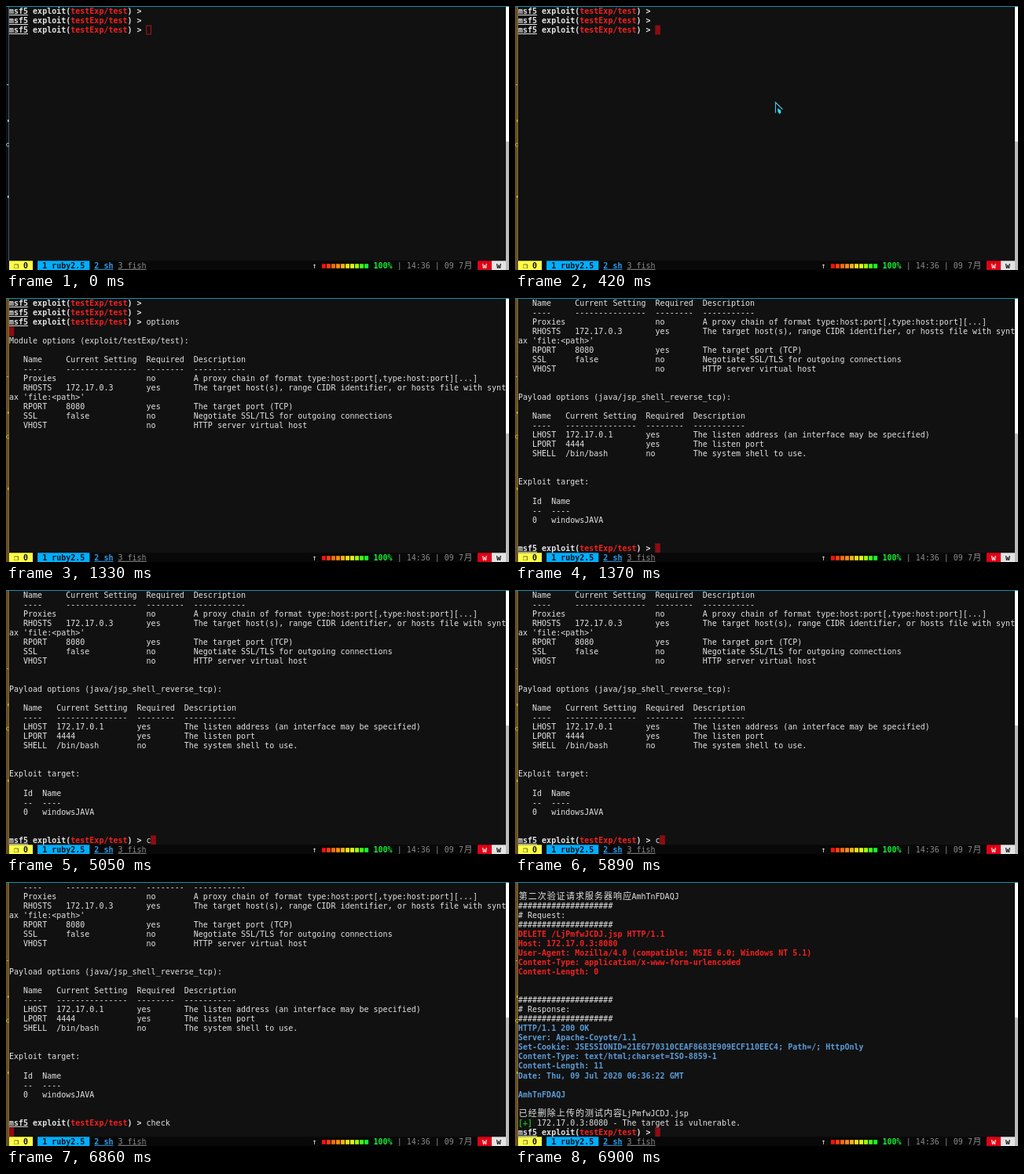
Write an HTML page with a canvas that moves like this. It is 640 by 337 pixels and loops after 8000 ms.

```html
<!DOCTYPE html>
<html lang="en">
<head>
<meta charset="utf-8">
<title>Terminal session</title>
<style>
html, body { margin: 0; width: 100%; height: 100%; overflow: hidden; background: #111; }
canvas { display: block; width: 640px; height: 337px; }
</style>
</head>
<body>
<canvas id="stage" width="640" height="337"></canvas>
<script>
const LOOP = 8000, CW = 6.02, RH = 12.03, LEFT = 4, TOP = 0.5, LAST = 26;
const FG = '#e2e2e2', RED = '#f4201f', BLUE = '#5b9bd6', GREEN = '#1fb31f', GREY = '#8a8a8a';
const MONO = '"DejaVu Sans Mono", "DejaVu Sans", monospace';
const CJK = '"Noto Sans CJK SC", "Noto Sans CJK", sans-serif';
const ctx = document.getElementById('stage').getContext('2d');

const OPTIONS = `   Name     Current Setting  Required  Description
   ----     ---------------  --------  -----------
   Proxies                   no        A proxy chain of format type:host:port[,type:host:port][...]
   RHOSTS   172.17.0.3       yes       The target host(s), range CIDR identifier, or hosts file with synt
ax 'file:<path>'
   RPORT    8080             yes       The target port (TCP)
   SSL      false            no        Negotiate SSL/TLS for outgoing connections
   VHOST                     no        HTTP server virtual host`.split('\n');

const PAYLOAD = `

Payload options (java/jsp_shell_reverse_tcp):

   Name   Current Setting  Required  Description
   ----   ---------------  --------  -----------
   LHOST  172.17.0.1       yes       The listen address (an interface may be specified)
   LPORT  4444             yes       The listen port
   SHELL  /bin/bash        no        The system shell to use.


Exploit target:

   Id  Name
   --  ----
   0   windowsJAVA
`.split('\n');

const HASHES = '#'.repeat(20);
const HEAD = ['', '第二次验证请求服务器响应AmhTnFDAQJ', HASHES, '# Request:', HASHES];
const REQUEST = `DELETE /LjPmfwJCDJ.jsp HTTP/1.1
Host: 172.17.0.3:8080
User-Agent: Mozilla/4.0 (compatible; MSIE 6.0; Windows NT 5.1)
Content-Type: application/x-www-form-urlencoded
Content-Length: 0`.split('\n');
const RESPONSE = `HTTP/1.1 200 OK
Server: Apache-Coyote/1.1
Set-Cookie: JSESSIONID=21E6770310CEAF8683E909ECF110EEC4; Path=/; HttpOnly
Content-Type: text/html;charset=ISO-8859-1
Content-Length: 11
Date: Thu, 09 Jul 2020 06:36:22 GMT

AmhTnFDAQJ`.split('\n');

// [time, text typed at the prompt]
const OPTIONS_KEYS = [[0, ''], [1000, 'o'], [1080, 'op'], [1160, 'opt'], [1250, 'options']];
const CHECK_KEYS = [[0, ''], [5050, 'c'], [5160, 'ch'], [5510, 'c'], [5720, ''], [5890, 'c'],
  [5970, 'ch'], [6050, 'che'], [6210, 'chec'], [6380, 'check'], [6590, 'check ']];

const cellX = col => LEFT + col * CW;
const cellY = row => TOP + row * RH;
const typed = (keys, t) => keys.filter(k => k[0] <= t).pop()[1];

function rect(x, y, w, h, color) {
  ctx.fillStyle = color;
  ctx.fillRect(x, y, w, h);
}

function path(points, close) {
  ctx.beginPath();
  points.forEach(p => ctx.lineTo(...p));
  if (close) ctx.closePath();
}

function text(col, row, str, color = FG, bold = false) {
  const weight = bold ? 'bold ' : '';
  const y = cellY(row) + 9.4;
  ctx.fillStyle = color;
  for (const run of str.match(/[\u3000-\u9fff]|[^\u3000-\u9fff]+/g) || []) {
    const wide = /[\u3000-\u9fff]/.test(run);
    ctx.font = wide ? `11px ${CJK}` : `${weight}10px ${MONO}`;
    ctx.fillText(run, cellX(col) + (wide ? 0.7 : 0), y);
    col += wide ? 2 : run.length;
  }
}

function lines(row, list, color, bold) {
  list.forEach((str, i) => text(0, row + i, str, color, bold));
}

function underline(col, row, count, color) {
  rect(cellX(col), cellY(row) + 10.5, count * CW, 1, color);
}

function cursor(col, row, hollow) {
  const x = cellX(col) - 0.3, y = cellY(row);
  if (hollow) {
    ctx.strokeStyle = '#b01616';
    ctx.lineWidth = 1;
    ctx.strokeRect(x + 0.5, y + 0.5, 5.6, 11);
  } else {
    rect(x, y, 6.6, RH, '#8c0d12');
  }
}

function prompt(row, input = '') {
  text(0, row, 'msf5 exploit(', FG, true);
  underline(0, row, 4, FG);
  text(13, row, 'testExp/test', RED, true);
  text(25, row, ') >', FG, true);
  text(29, row, input);
}

function promptWithCursor(row, input, hollow) {
  cursor(29 + input.length, row, hollow);
  prompt(row, input);
}

function emptyScreen(t) {
  prompt(0);
  prompt(1);
  if (t < 1330) {
    promptWithCursor(2, typed(OPTIONS_KEYS, t), t < 40);
    return;
  }
  prompt(2, 'options');
  cursor(0, 3);
  text(0, 4, 'Module options (exploit/testExp/test):');
  lines(6, OPTIONS);
}

function optionsScreen(t) {
  const sent = t >= 6860;
  const shift = sent ? 1 : 0;
  lines(-shift, OPTIONS);
  lines(8 - shift, PAYLOAD);
  if (sent) {
    prompt(LAST - 1, 'check ');
    cursor(0, LAST);
  } else {
    promptWithCursor(LAST, typed(CHECK_KEYS, t));
  }
}

function resultScreen() {
  lines(0, HEAD);
  lines(5, REQUEST, RED, true);
  lines(12, [HASHES, '# Response:', HASHES]);
  lines(15, RESPONSE, BLUE, true);
  text(0, 24, '已经删除上传的测试内容LjPmfwJCDJ.jsp');
  text(0, 25, '[+]', GREEN, true);
  text(4, 25, '172.17.0.3:8080 - The target is vulnerable.');
  promptWithCursor(LAST, '');
}

function statusBar() {
  const row = 27, y = cellY(row);
  const block = (col, str, bg, fg) => {
    rect(cellX(col), y, str.length * CW, RH, bg);
    text(col, row, str, fg, true);
  };
  rect(LEFT, y, 632, RH, '#080808');
  block(0, ' ❐ 0 ', '#ffff4a', '#141408');
  block(6, ' 1 ruby2.5 ', '#00afff', '#06131c');
  text(18, row, '2 sh', '#2a9be6', true);
  underline(18, row, 4, '#2a9be6');
  text(23, row, '3 fish', GREY);
  underline(23, row, 6, GREY);
  text(64, row, '↑', '#e4e4e4');
  const hues = [0, 12, 24, 32, 42, 54, 66, 82, 105, 128];
  hues.forEach((h, i) => rect(cellX(66 + i) + 0.6, 329.2, 5, 5.6, `hsl(${h} 95% 52%)`));
  text(77, row, '100%', '#10f030', true);
  text(82, row, '| 14:36 | 09 7月', GREY);
  block(99, ' w ', '#e00016', '#f0e8e8');
  block(102, ' w ', '#e4e4e4', '#101010');
}

function mix(a, b, k) {
  return `rgb(${a.map((v, i) => Math.round(v + (b[i] - v) * k)).join(',')})`;
}

// Sliver of the neighbouring window, top border and scrollbar.
function edges(t) {
  const k = Math.min(1, Math.max(0, t / 420));
  rect(0, 0, LEFT, 337, mix([17, 17, 17], [104, 78, 36], k));
  rect(3, 0, 1, 325, mix([60, 92, 96], [134, 102, 50], k));
  const speck = mix([200, 200, 200], [186, 186, 44], k);
  rect(1, 100, 2, 1, speck);
  rect(2, 145, 1.5, 3, speck);
  rect(2, 242, 1.5, 3, speck);
  ctx.beginPath();
  ctx.arc(2.5, 177.2, 2, 0.7, 5.6);
  ctx.strokeStyle = speck;
  ctx.lineWidth = 1;
  ctx.stroke();
  rect(0, 0, 640, 1, '#0794b4');
  rect(636, 1, 4, 172, '#ffffff');
  rect(636, 173, 4, 164, '#bcbcbc');
}

function pointer(t) {
  if (t < 40 || t >= 1000) return;
  const k = Math.min(1, (t - 40) / 380);
  const away = (1 - k) ** 3;
  ctx.save();
  ctx.translate(331 + 300 * away, 122 + 60 * away);
  path([[0.5, 14.5], [0.5, 1], [9.5, 10]]);
  ctx.strokeStyle = '#5cb4d4';
  ctx.lineWidth = 1.2;
  ctx.stroke();
  path([[3, 8.5], [7, 11], [7.5, 14], [5.5, 16], [3.5, 13]], true);
  ctx.fillStyle = '#22e4fa';
  ctx.fill();
  ctx.restore();
}

function draw(t) {
  rect(0, 0, 640, 337, '#111111');
  if (t < 1370) emptyScreen(t);
  else if (t < 6900) optionsScreen(t);
  else resultScreen();
  statusBar();
  edges(t);
  pointer(t);
}

const start = performance.now();
function tick() {
  draw((performance.now() - start) % LOOP);
  requestAnimationFrame(tick);
}
tick();
</script>
</body>
</html>
```
